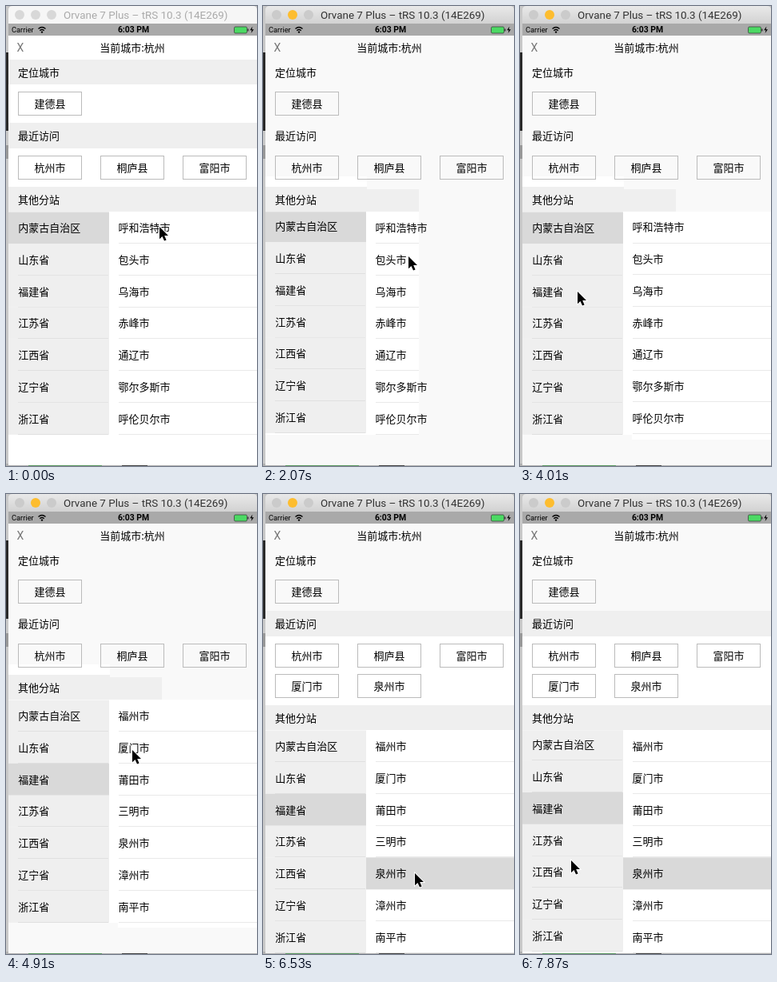
Write an HTML page that moves like this. It is 314 px wide and 575 px high and loops after 8 s.

```html
<!DOCTYPE html>
<html lang="zh">
<head>
<meta charset="utf-8">
<title>City picker</title>
<style>
html, body { margin: 0; width: 100%; height: 100%; overflow: hidden; background: #c4c4c4; }
svg { display: block; width: 314px; height: 575px; font: 13px "Noto Sans CJK SC", "Noto Sans CJK", sans-serif; }
.bar { font-family: Roboto, "Liberation Sans", sans-serif; }
</style>
</head>
<body>
<svg id="stage" viewBox="0 0 314 575"></svg>
<script>
const LOOP = 8000, FIRST = 430, TICK = 148.6;
const ROW = 39.75, TABLE = 279;
const GRAY = '#efefef', PICKED = '#d9d9d9', PALE = '#f9f9f9';
// Ticks at which the screen reacts
const REVEAL = 13, PROVINCE = 26, CITY_A = 33, CITY_B = 42;

const provinces = ['内蒙古自治区', '山东省', '福建省', '江苏省', '江西省', '辽宁省', '浙江省'];
const mongolia = ['呼和浩特市', '包头市', '乌海市', '赤峰市', '通辽市', '鄂尔多斯市', '呼伦贝尔市'];
const fujian = ['福州市', '厦门市', '莆田市', '三明市', '泉州市', '漳州市', '南平市'];

// Places where the pointer turns or rests: tick, x, y
const stops = [
  [0, 192, 276], [4, 100, 350], [8, 100, 218], [12, 182, 313], [19, 206, 505],
  [22, 132, 300], [25, 72, 357], [27, 72, 357], [31, 158, 320], [33, 158, 320],
  [36, 141, 286], [40, 190, 474], [42, 190, 474], [44, 80, 465], [47, 68, 335], [51, 64, 458]
];

const ease = p => p * p * (3 - 2 * p);

function pointerAt(n) {
  const i = Math.max(1, stops.findIndex(s => s[0] >= n));
  const [t0, x0, y0] = stops[i - 1], [t1, x1, y1] = stops[i];
  const p = ease((n - t0) / (t1 - t0));
  return [x0 + (x1 - x0) * p, y0 + (y1 - y0) * p];
}

// A list is dragged until the peak, then springs back
function pull(n, from, peak, amount) {
  if (n <= from) return 0;
  return amount * (n < peak ? ease((n - from) / (peak - from)) : Math.exp(.9 * (peak - n)));
}
const leftShift = n => pull(n, 4, 8, -66) + pull(n, 43, 47, -67);
const rightShift = n => pull(n, 12, 15, 40) + pull(n, 19, 21, -26);

const rect = (x, y, w, h, fill, more = '') =>
  `<rect x="${x}" y="${y}" width="${w}" height="${h}" fill="${fill}" ${more}/>`;
const text = (x, mid, s, more = '') => `<text x="${x}" y="${mid + 4.7}" ${more}>${s}</text>`;
const centred = 'text-anchor="middle"';
const crisp = 'shape-rendering="crispEdges"';

function backdrop() {
  return rect(0, 0, 3, 575, '#c9c9c9') + rect(0, 58, 3, 98, '#292929') + rect(0, 174, 3, 17, '#999') +
    rect(0, 572, 314, 3, '#b2b2b2') + rect(28, 573, 92, 2, '#5d9a62') + rect(145, 573, 32, 2, '#444');
}

function titleBar(active) {
  const dots = [17, 37, 57].map((x, i) => {
    const fill = active && i === 1 ? '#fdbd2f' : active ? '#cbcbcb' : '#d8d8d8';
    return `<circle cx="${x}" cy="11" r="6" fill="${fill}"/>`;
  }).join('');
  return `<path d="M3 22V5q0-5 5-5H309q5 0 5 5V22z" fill="${active ? 'url(#chrome)' : '#f6f6f6'}"/>` + dots +
    `<text class="bar" x="72" y="16" font-size="13.4" fill="${active ? '#333' : '#aaa'}">Orvane 7 Plus – tRS 10.3 (14E269)</text>`;
}

function statusBar() {
  return rect(3, 22, 311, 15, '#a9a9a9') +
    '<text class="bar" x="7" y="33" font-size="9.3">Carrier</text>' +
    '<g fill="none" stroke="#000" stroke-width="1.4"><path d="M40.5 28.6q4.5-4 9 0M42.3 30.7q2.7-2.4 5.4 0"/></g>' +
    '<circle cx="45" cy="32.6" r="1.2"/>' +
    `<text class="bar" x="159.5" y="33.2" font-size="10.4" font-weight="600" ${centred}>6:03 PM</text>` +
    rect(285.5, 26, 16, 8, '#4cd964', 'rx="1.5" stroke="#333" stroke-width=".7"') + rect(302.2, 28.5, 1.3, 3, '#333') +
    '<path d="M308.4 25.6l-3.2 4.6h2.3l-.9 3.8 3.4-4.8h-2.4z"/>';
}

function background(n, shift, edge) {
  if (n > 0 && n < CITY_A) {
    // partly refreshed screen
    return rect(3, 37, 311, 537, PALE) + rect(3, 213, 127, 13, '#fff') +
      rect(3, 226, 127, 31, GRAY) + rect(130, 229, 65, 28, GRAY) + rect(3, 257, 192, 279, '#fff') +
      (n < REVEAL ? '' : rect(140, 271, edge - 140, 271, '#fff')) +
      (n < 20 ? '' : rect(195, 257, edge - 195, 14, '#fff'));
  }
  const top = n ? rect(3, 37, 311, 109, PALE) : rect(3, 67, 311, 31, GRAY);
  return rect(3, 37, 311, 537, '#fff') + top + rect(3, 146, 311, 32, GRAY) + rect(3, 226 + shift, 311, 31, GRAY);
}

function chip(i, y, label) {
  const x = Math.floor(103.2 * i) + 15.5;
  return rect(x, y + .5, 79, 29, 'none', 'stroke="#bbb"') + text(x + 39.5, y + 15, label, centred);
}

function table({ id, x, w, top, offset, rows, picked, fill, inset, line, lineEnd, count }) {
  let out = '';
  for (let i = 0; i < count; i++) {
    const y = i * ROW, on = i === picked;
    if (rows[i]) out += rect(x, y, w, ROW + .3, on ? PICKED : fill) + text(x + inset, y + 20.2, rows[i]);
    if (!on) out += rect(x + inset, y + ROW - .8, lineEnd - x - inset, 1, line, crisp);
  }
  return `<clipPath id="${id}">${rect(x, top, w, TABLE, '#fff')}</clipPath>` +
    `<g clip-path="url(#${id})"><g transform="translate(0 ${top + offset})">${out}</g></g>`;
}

function scene(n) {
  const added = n >= CITY_A, shift = added ? 38 : 0, top = 257.3 + shift;
  const inFujian = n >= PROVINCE;
  const edge = n > 0 && n < REVEAL ? 195 : 314;
  const recent = ['杭州市', '桐庐县', '富阳市'];
  if (added) recent.push('厦门市');
  if (n >= CITY_B) recent.push('泉州市');
  const [px, py] = pointerAt(n);

  return '<linearGradient id="chrome" x2="0" y2="1"><stop stop-color="#e9e9e9"/><stop offset="1" stop-color="#d2d2d2"/></linearGradient>' +
    backdrop() + background(n, shift, edge) + titleBar(n > 0) + statusBar() +
    `<text class="bar" x="18" y="57" font-size="14" fill="#777" ${centred}>X</text>` +
    text(158, 52, '当前城市:杭州', centred) +
    text(15, 83, '定位城市') + text(15, 162.5, '最近访问') + text(15, 242 + shift, '其他分站') +
    chip(0, 107.5, '建德县').replaceAll('108"', '107.5"') +
    recent.map((s, i) => chip(i % 3, 187 + 38 * Math.floor(i / 3), s)).join('') +
    table({
      id: 'left', x: 3, w: 126, top, offset: leftShift(n), rows: provinces, picked: inFujian ? 2 : 0,
      fill: GRAY, inset: 12.3, line: '#e0e0e0', lineEnd: 128, count: 9
    }) +
    table({
      id: 'right', x: 129, w: 185, top, offset: rightShift(n), rows: inFujian ? fujian : mongolia,
      picked: n >= CITY_B ? 4 : added ? 1 : -1,
      fill: 'none', inset: 11.6, line: '#e9e9e9', lineEnd: edge, count: 7
    }) +
    `<path transform="translate(${px} ${py})" d="M0 0V15.2L3.5 12 6 17.6 8.6 16.4 6.2 11H11z" stroke="#fff" stroke-width="1.8" paint-order="stroke"/>`;
}

const stage = document.getElementById('stage');
const start = performance.now();
let shown = -1;

function frame() {
  const t = (performance.now() - start) % LOOP;
  const n = Math.max(0, Math.floor((t - FIRST) / TICK) + 1);
  if (n !== shown) stage.innerHTML = scene(shown = n);
  requestAnimationFrame(frame);
}
frame();
</script>
</body>
</html>
```
